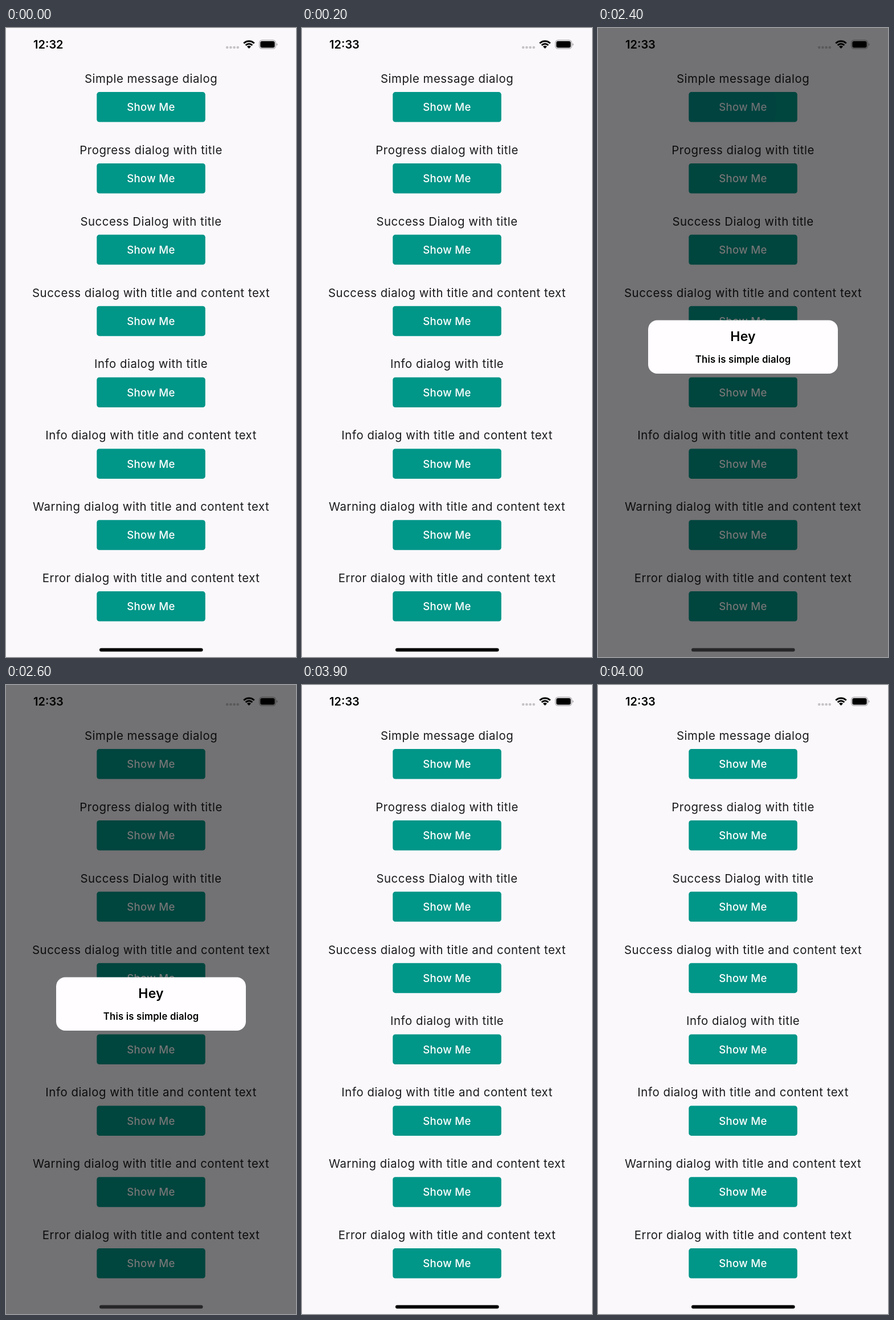
Recreate the animation shown at these times as an HTML page. Size 509 by 1101 pixels, loop 5000 ms.

```html
<!DOCTYPE html>
<html lang="en">
<head>
<meta charset="utf-8">
<title>Dialogs</title>
<style>
  html, body { margin: 0; width: 100%; height: 100%; overflow: hidden; background: #faf8fb; }
  svg { display: block; width: 509px; height: 1101px; font-family: Inter, "Noto Sans", sans-serif; }
  .mid { text-anchor: middle; }
  .label { font-size: 20.4px; letter-spacing: .52px; fill: #1b1a1d; }
  .show { font-size: 18.6px; font-weight: 500; letter-spacing: .3px; fill: #fff; }
  .clock { font-size: 20px; font-weight: 600; }
  .title { font-size: 23px; font-weight: 600; letter-spacing: .2px; }
  .body { font-size: 16.7px; font-weight: 600; letter-spacing: .2px; }
</style>
</head>
<body>
<svg viewBox="0 0 509 1101">
  <clipPath id="clip"><rect x="159.3" y="112.1" width="190.5" height="52.5" rx="4.5"/></clipPath>
  <rect width="509" height="1101" fill="#faf8fb"/>
  <text id="clock" class="clock" x="48.1" y="36.2"></text>
  <g fill="#c5c3c6">
    <circle cx="388.2" cy="34" r="2.3"/><circle cx="394.4" cy="34" r="2.3"/>
    <circle cx="400.6" cy="34" r="2.3"/><circle cx="406.8" cy="34" r="2.3"/>
  </g>
  <g fill="none" stroke="#000" stroke-width="3">
    <path d="M417.3 26.8a13 13 0 0 1 18.4 0M420.7 30.2a8.2 8.2 0 0 1 11.6 0"/>
    <path d="M426.5 36l-3.5-3.5a4.9 4.9 0 0 1 7 0z" fill="#000" stroke="none"/>
  </g>
  <rect x="444.6" y="21.4" width="28.8" height="14.8" rx="4.6" fill="none" stroke="#a3a1a4" stroke-width="1.2"/>
  <rect x="446.3" y="23.1" width="25.4" height="11.4" rx="3"/>
  <path d="M474.8 26.5q1.8.7 1.8 2.3t-1.8 2.3z" fill="#a3a1a4"/>
  <g id="list"></g>
  <circle id="ripple" cx="235" cy="138.5" r="78" fill="#1464a0" clip-path="url(#clip)"/>
  <rect id="scrim" width="509" height="1101"/>
  <rect id="home" x="164" y="1085.4" width="181.6" height="6" rx="3"/>
  <g id="dialog">
    <rect x="88" y="511.5" width="333" height="93.5" rx="16" fill="#fffdff"/>
    <text class="mid title" x="254.6" y="548">Hey</text>
    <text class="mid body" x="254.6" y="586.2">This is simple dialog</text>
  </g>
</svg>
<script>
const $ = id => document.getElementById(id);
const labels = [
  'Simple message dialog', 'Progress dialog with title', 'Success Dialog with title',
  'Success dialog with title and content text', 'Info dialog with title',
  'Info dialog with title and content text', 'Warning dialog with title and content text',
  'Error dialog with title and content text'
];
$('list').innerHTML = labels.map((label, i) => `
  <g transform="translate(0 ${i * 124.86})">
    <text class="mid label" x="254.6" y="96">${label}</text>
    <rect x="159.3" y="112.1" width="190.5" height="52.5" rx="4.5" fill="#009688"/>
    <text class="mid show" x="254.4" y="145.3">Show Me</text>
  </g>`).join('');

const between = (t, a, b) => t >= a && t < b;

function draw(now) {
  const t = now % 5000;
  const open = between(t, 2400, 3800);
  const fading = !open && between(t, 2300, 3900);
  const fade = (id, full, part) => $(id).setAttribute('opacity', open ? full : fading ? part : 0);
  fade('scrim', .54, .465);
  fade('dialog', 1, .73);
  $('home').setAttribute('fill', open ? '#262528' : fading ? '#1c1b1d' : '#000');
  $('ripple').setAttribute('opacity', between(t, 2300, 2600) ? .12 * (1 - Math.floor((t - 2300) / 100) / 3) : 0);
  $('clock').textContent = t < 200 ? '12:32' : '12:33';
  requestAnimationFrame(draw);
}
draw(0);
</script>
</body>
</html>
```
